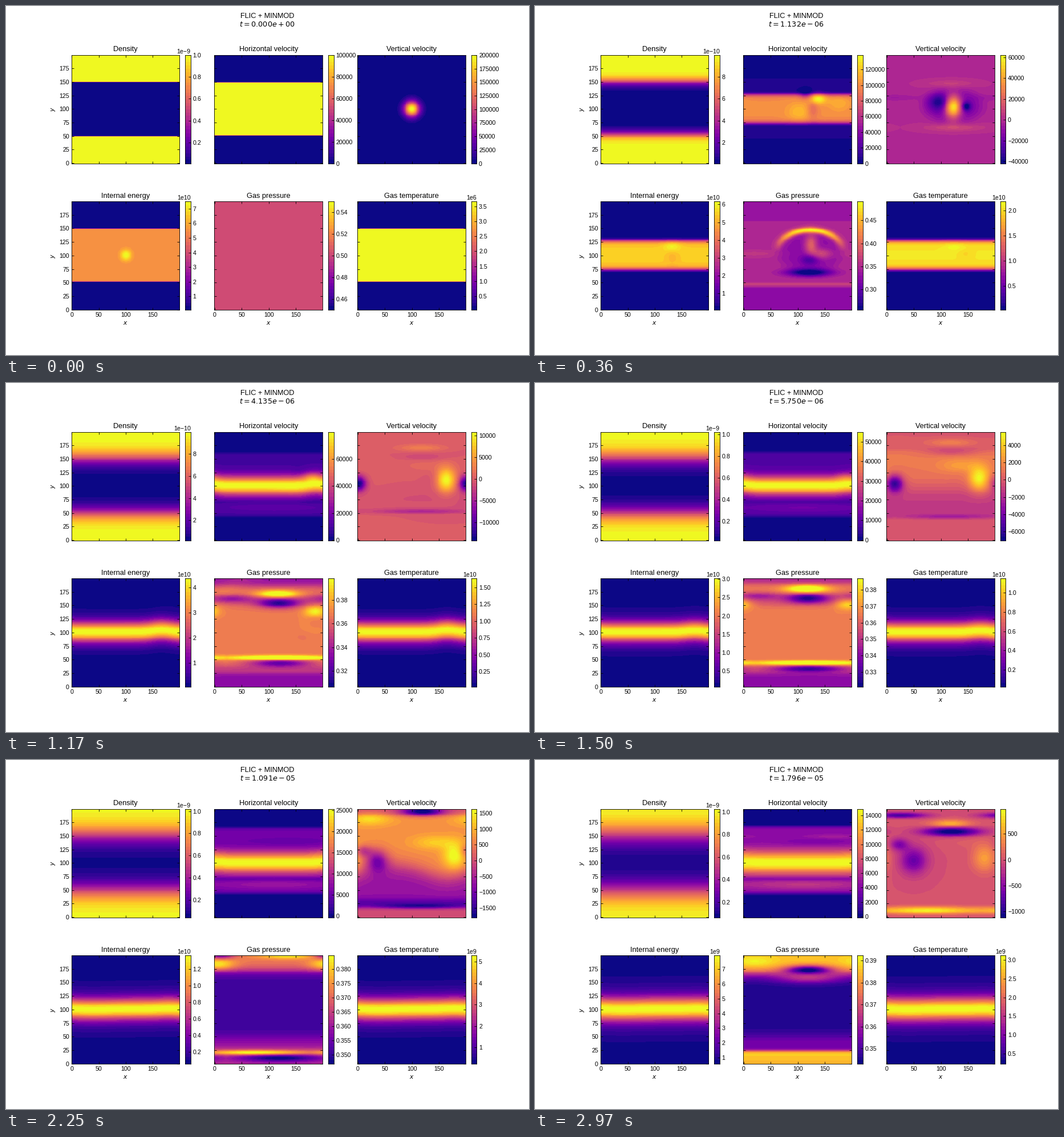
These frames come from a looping animation (917x611 px, 3000 ms). A matplotlib script:

```python
import numpy as np
import matplotlib.pyplot as plt
from matplotlib.animation import FuncAnimation

W, H, DPI = 917, 611, 76.4
FRAMES, STEP = 100, 30
SIDE = 189.8
TITLES = ("Density", "Horizontal velocity", "Vertical velocity",
          "Internal energy", "Gas pressure", "Gas temperature")

# clock and colour limits at a few key moments
KEYS = np.array([0, 12, 39, 50, 75, 90, 99])
CLOCK = (0, 1.132, 4.135, 5.750, 10.91, 15.08, 17.96)
SPEED = (10, 13.86, 7.99, 5.495, 2.534, 1.764, 1.49)
SINK = (-20, -83.6, -28.2, -14, -3.59, -1.604, -2.228)
RISE = (400, 124.4, 21.6, 11.04, 3.252, 2.128, 1.96)
HEAT = (7.49, 6.16, 4.35, 3.015, 1.362, 0.948, 0.793)
P_LOW = (0.2, 0.255, 0.3065, 0.3208, 0.3468, 0.3444, 0.343)
P_HIGH = (0.8, 0.491, 0.398, 0.3868, 0.3847, 0.4197, 0.3923)

plt.rcParams.update({
    "font.family": "Liberation Sans", "font.size": 10,
    "xtick.direction": "in", "ytick.direction": "in",
    "xtick.top": True, "ytick.right": True,
})

x = np.arange(200.0)
y = x[:, None]


def keyed(f, v):
    """Monotone cubic through the values v at KEYS."""
    h = np.diff(KEYS)
    d = np.diff(v) / h
    m = np.r_[d[0], np.zeros(len(h) - 1), d[-1]]
    for j in range(1, len(h)):
        if d[j - 1] * d[j] > 0:
            m[j] = 2 * d[j - 1] * d[j] / (d[j - 1] + d[j])
    i = min(np.searchsorted(KEYS, f, "right") - 1, len(h) - 1)
    u = (f - KEYS[i]) / h[i]
    return (v[i] * (1 + 2 * u) * (1 - u) ** 2 + v[i + 1] * u * u * (3 - 2 * u)
            + h[i] * u * (1 - u) * (m[i] * (1 - u) - m[i + 1] * u))


def level(f, v):
    """Near-geometric version of keyed."""
    return np.sinh(keyed(f, np.arcsinh(v)))


# Time shapes

def ease(f, a, b):
    u = np.clip((f - a) / (b - a), 0, 1)
    return u * u * (3 - 2 * u)


def bump(f, c, w):
    return np.exp(-0.5 * ((f - c) / w) ** 2)


def early(f):
    """Transient that peaks at 12 and dies out."""
    return (f / 12 * np.exp(1 - f / 12)) ** 2


# Space shapes; x is periodic

def gx(cx, sx):
    return np.exp(-0.5 * (((x - cx + 100) % 200 - 100) / sx) ** 2)


def gy(cy, sy):
    return np.exp(-0.5 * ((y - cy) / sy) ** 2)


def blob(cx, cy, sx, sy):
    return gx(cx, sx) * gy(cy, sy)


def step(d, w):
    return 0.5 + 0.5 * np.tanh(d / w)


def box(lo, hi, w):
    return step(y - lo, w) - step(y - hi, w)


def core(f, c):
    """Flat layer that shrinks to a rounded ridge, then spreads slowly."""
    h = 13 + 36 * np.exp(-f / 12) + 0.07 * max(f - 45, 0)
    p = 1 / (0.01 + 0.49 * ease(f, 0, 39))
    return np.exp(-np.log(2) * (np.abs(y - c) / h) ** p)


# Paths shared by the fields

def jet(f):
    return 181 - 81 * np.exp(-(f / 28) ** 1.3), 100.5 + 13 * np.sin(np.pi * f / 130)


def rising(f):
    return 147 + 0.87 * (f - 12)


def falling(f):
    return 172 - 1.55 * (f - 90)


def lower(f):
    return 53.5 - 0.92 * (f - 39)


def lift(f):
    return 3.5 * ease(f, 12, 39) * np.exp(-max(f - 39, 0) / 35)


# Fields, normalised to their colour limits

def density(f, lo, hi):
    w = 0.5 + 2.65 * np.sqrt(f)
    top = 150.5 + 0.03 * f
    low = 50.5 + 3 * early(f) - 0.02 * f
    return step(y - top, w) + step(low - y, w) + 0 * x


def horizontal(f, lo, hi):
    xj, _ = jet(f)
    shelf = 0.003 * f * box(44, 157 + 0.1 * f, 1 + 2 * ease(f, 0, 39))
    shelf = shelf + 0.0014 * f * blob(110, 60, 90, 6) - 0.0011 * f * gy(71, 3)
    shelf = shelf - 0.06 * ease(f, 50, 90) * blob(135, 139, 50, 4)
    shelf = shelf + 0.07 * ease(f, 75, 99) * blob(165, 149, 32, 3)
    v = shelf + (min(1, 1e5 / hi) - shelf) * core(f, 100.8 + lift(f) * gx(xj + 25, 14))
    e = early(f)
    v = v + e * (0.3 * blob(xj + 14, 120, 11, 7) + 0.12 * blob(xj - 20, 95, 16, 12)
                 - 0.13 * blob(xj + 5, 100, 7, 13) - 0.2 * blob(xj - 8, 126, 8, 6)
                 + 0.09 * blob(176, 111, 14, 10))
    return v + 0.03 * lift(f) * blob(xj + 13, 117, 12, 5)


def vertical(f, lo, hi):
    xj, yj = jet(f)
    up, down, low = rising(f), falling(f), lower(f)
    e = early(f)
    v = -lo / (hi - lo)

    # slow shear between the outgoing waves
    shear = 0.21 * ease(f, 30, 70) * (1 - ease(f, 86, 99))
    turn = 97 - 25 * gx(165, 40) * ease(f, 50, 80)
    v = v + shear * np.tanh((y - turn) / 20) * box(low, min(up - 14, down), 5)
    v = v + 0.15 * ease(f, 30, 60) * (1 - ease(f, 88, 104)) * blob(xj - 36, 138, 28, 9)

    # jet, and the sink ahead of it with its arm
    v = v + blob(xj, yj, 10 + 0.06 * f, 10 + 4 * ease(f, 0, 12) + 0.04 * f) / (1 + f / 30)
    xs, size = xj + 18 + 0.52 * f, 4 + 0.14 * f
    v = v - 0.8 * ease(f, 0, 25) * np.exp(-f / 110) * blob(xs, 105, size, size)
    v = v - 0.26 * ease(f, 40, 75) * blob(xs - 27, 105 + 0.5 * (f - 40), 12, 8)

    # first front
    r = np.hypot((x - xj) / (18 + 3 * f), (y - 106) / (16 + 1.3 * f))
    v = v - e * (0.17 * np.exp(-r ** 4) + 0.24 * blob(xj - 26, 113, 13, 10)
                 + 0.06 * blob(15, 121, 30, 4) - 0.1 * blob(125, 66, 40, 5))

    # waves up to the top and back
    out = 0.12 * ease(f, 0, 20) * (1 - ease(f, 55, 68))
    v = v + out * (blob(118, up, 32, 5) - ease(f, 25, 50) * blob(120, up - 17, 34, 5))
    v = v - 0.58 * ease(f, 62, 75) * blob(120, down, 25 + 12 * ease(f, 75, 90), 5.5)
    v = v + 0.58 * ease(f, 75, 90) * (1 - 0.5 * ease(f, 90, 99)) * blob(118, down + 15, 26, 5)
    v = v + 0.22 * bump(f, 79, 11) * blob(22, 183, 28, 9)
    v = v - 0.45 * ease(f, 80, 99) * blob(25, 188 + 0.8 * (99 - f), 34, 4)

    # waves to the floor and back
    v = v - (0.15 + 0.12 * ease(f, 50, 75)) * ease(f, 15, 39) * (1 - ease(f, 92, 99)) * (
        blob(115, low, 60, 3) + 0.6 * ease(f, 60, 75) * gy(low + 6, 6))
    return v + ease(f, 86, 99) * gy(13 - 1.6 * (99 - f), 5) * (0.24 + 0.2 * gx(75, 45))


def thermal(f, top):
    xj, _ = jet(f)
    c = 100.8 + lift(f) * gx(xj + 2, 17) - ease(f, 45, 75) * gx(40, 35)
    tail = 0.18 * ease(f, 0, 39)
    return min(1, top) * ((1 - tail) * core(f, c) + tail * gy(c, 22 + 0.17 * max(f - 39, 0)))


def energy(f, lo, hi):
    xj, _ = jet(f)
    v = thermal(f, 5.45e10 / hi)
    v = v + 0.28 * np.exp(-f / 13) * blob(xj + 0.7 * f, 100.5 + 1.4 * f, 7 + 0.3 * f, 7)
    return v - 0.06 * early(f) * blob(xj + 9, 97, 8, 9)


def temperature(f, lo, hi):
    xj, _ = jet(f)
    v = thermal(f, 1 - 0.06 * early(f))
    return v + early(f) * (0.06 * blob(xj + 2, 117, 13, 6) - 0.04 * blob(xj + 23, 103, 8, 6))


def pressure(f, lo, hi):
    if f == 0:
        return 0.5 + 0 * (x + y)
    up, down, low = rising(f), falling(f), lower(f)
    out = ease(f, 15, 39) * (1 - ease(f, 52, 66))

    # layers
    mid = 0.4 + 0.28 * ease(f, 12, 39) - 0.64 * ease(f, 52, 80)
    top = 0.32 + 0.36 * ease(f, 42, 78) + 0.18 * ease(f, 90, 99)
    low_p = 0.3 + 0.1 * bump(f, 75, 8) + 0.53 * ease(f, 90, 99)
    yt = 163 + 27 * ease(f, 12, 50) - 19 * ease(f, 52, 75) - 5 * ease(f, 88, 99)
    wt = 1.5 + 6 * ease(f, 12, 39) + 3 * ease(f, 52, 75)
    wb = 1.5 + 6 * ease(f, 12, 39) - 4 * ease(f, 92, 99)
    v = mid + (top - mid) * step(y - yt, wt) + (low_p - mid) * step(43 - 0.2 * f - y, wb)
    v = v + 0.2 * ease(f, 60, 75) * gy(36, 13) + out * (0.1 * gy(28, 4) - 0.15 * gy(160, 9))

    # expanding front
    start = np.exp(-(f / 24) ** 2)
    xj, yj = jet(f)
    r = np.hypot((x - xj) / (10 + 4.2 * f), (y - yj - 2) / (8 + 2.7 * f))
    crown = np.clip((y - yj) / 40, 0, 1) ** 1.3
    v = v + start * (0.75 * np.exp(-((r - 1) / 0.13) ** 2) * crown - 0.13 * np.exp(-r ** 6))
    v = v + early(f) * (0.28 * blob(xj + 2, 120, 8, 13) + 0.2 * blob(xj + 21, 103, 13, 7)
                        - 0.2 * blob(xj, 92, 11, 7) + 0.1 * gy(47, 2)
                        + 0.05 * blob(20, 103, 35, 4))

    # waves up to the top and back
    v = v + out * (0.56 * blob(117, up, 27, 5) - 0.5 * blob(119, up - 17, 26, 6.5)
                   - 0.22 * blob(27, 162 + 0.5 * (f - 39), 30, 5))
    v = v + bump(f, 75, 7) * (0.3 * blob(135, 199, 35, 4) - 0.45 * blob(10, 199, 18, 4))
    v = v - 0.75 * ease(f, 80, 99) * blob(120, down + 15, 29, 5.5)
    v = v + 0.28 * ease(f, 88, 99) * blob(120, down - 1, 42, 7)
    side = 139 + 1.2 * (f - 39)
    v = v + 0.32 * ease(f, 12, 40) * (1 - 0.6 * ease(f, 92, 99)) * blob(
        186 + 0.58 * (f - 39), min(side, 399 - side), 6 + 0.2 * f, 7)

    # pair of waves to the floor
    lane = ease(f, 15, 39) * (1 - ease(f, 92, 99))
    v = v + lane * (0.45 * blob(122 - 45 * ease(f, 52, 75), low, 57, 3) + 0.13 * gy(low, 3))
    v = v - 0.45 * ease(f, 0, 10) * (1 - ease(f, 76, 86)) * blob(
        121, low - 10, 24 + 0.4 * f, 5)
    return v


FIELDS = (density, horizontal, vertical, energy, pressure, temperature)

# the initial state has its own limits
START = {0: (1e-11, 1e-9), 2: (0, 2e5), 4: (0.45, 0.55), 5: (4e4, 3.66e6)}


def limits(f):
    heat = level(f, HEAT)
    dense = 0.998 + 0.022 * ease(f, 39, 50) + 0.05 * bump(f, 90, 4)
    spans = [
        (1e-9 * (0.01 + 0.0535 * (f / 99) ** 2), 1e-9 * dense),
        (-400 * bump(f, 70, 20), 1e4 * level(f, SPEED)),
        (500 * level(f, SINK), 500 * level(f, RISE)),
        (5.5e8, 1e10 * heat),
        (level(f, P_LOW), level(f, P_HIGH)),
        (2.2e8, 1e10 * heat * (0.4 - 0.06 * np.exp(-f / 45))),
    ]
    return [START.get(n, s) for n, s in enumerate(spans)] if f == 0 else spans


def place(left, top, w, h):
    return fig.add_axes([left / W, 1 - (top + h) / H, w / W, h / H])


fig = plt.figure(figsize=(W / DPI, H / DPI), dpi=DPI, facecolor="white")
head = fig.suptitle("")
look = dict(cmap=plt.get_cmap("plasma", 32), vmin=0, vmax=1, origin="lower",
            aspect="auto", interpolation="nearest")
ramp = np.linspace(0, 1, 200)[:, None]
images, bars = [], []

for n, title in enumerate(TITLES):
    row, col = divmod(n, 3)
    left, top = 114.62 + 250.83 * col, 85.8 + 256.65 * row
    ax = place(left, top, SIDE, SIDE)
    images.append(ax.imshow(np.zeros((200, 200)), extent=(-0.5, 199.5, -0.5, 199.5), **look))
    ax.set_title(title)
    ax.tick_params(labelbottom=row == 1, labelleft=col == 0)
    if row == 1:
        ax.set_xlabel("$x$")
    if col == 0:
        ax.set_ylabel("$y$")
    cax = place(left + 199.5, top, 9.55, SIDE)
    bars.append(cax.imshow(ramp, extent=(0, 1, 0, 1), **look))
    cax.set_xticks([])
    cax.yaxis.tick_right()
    cax.tick_params(left=False, right=True)
    cax.yaxis.set_offset_position("right")


def draw(f):
    head.set_text(f"FLIC + MINMOD\n$t = {1e-6 * keyed(f, CLOCK):.3e}$")
    for field, image, bar, (lo, hi) in zip(FIELDS, images, bars, limits(f)):
        image.set_data(np.clip(field(f, lo, hi), 0, 1))
        bar.set_extent((0, 1, lo, hi))
        bar.axes.set_ylim(lo, hi)
    return [head, *images, *bars]


anim = FuncAnimation(fig, draw, frames=FRAMES, interval=STEP, repeat=True, blit=False)
plt.show()
```
